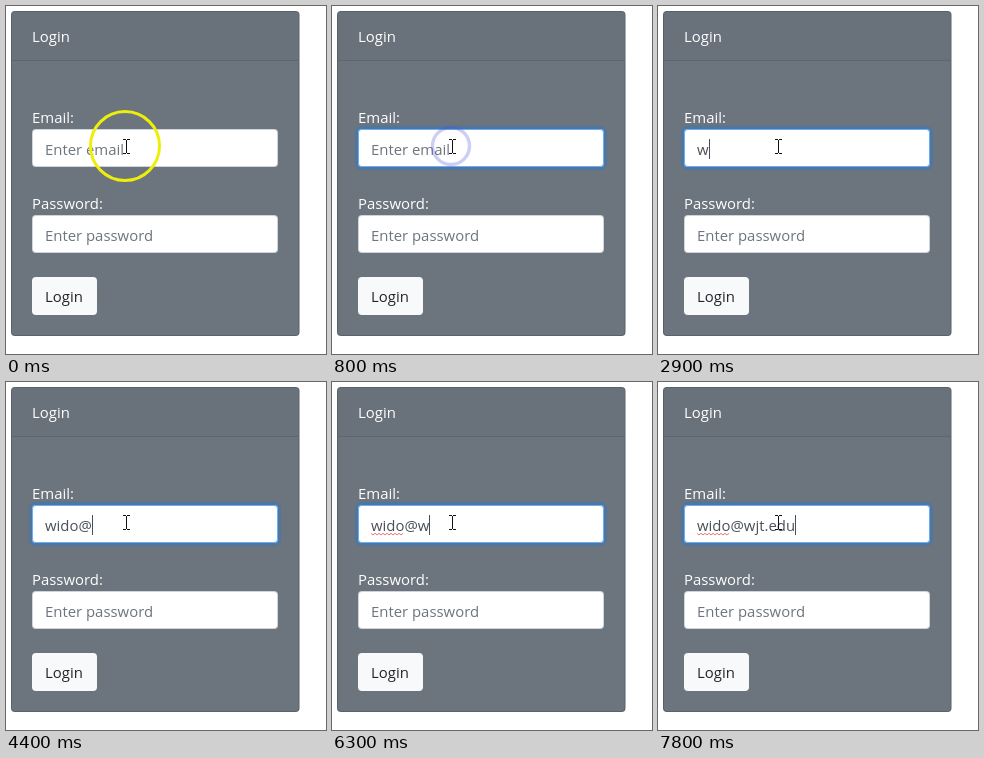
Animation, 320 px wide and 348 px high, one loop 8000 ms. Source, as an HTML page with a canvas:

```html
<!DOCTYPE html>
<html lang="en">
<head>
<meta charset="utf-8">
<title>Login form</title>
<style>
  html, body { margin: 0; width: 100%; height: 100%; overflow: hidden; background: #fff; }
  canvas { display: block; width: 320px; height: 348px; }
</style>
</head>
<body>
<canvas id="stage"></canvas>
<script>
const LOOP = 8000;
const EMAIL = 'wido@wjt.edu';
const FONT = '14.9px "Open Sans", "Noto Sans", sans-serif';
const POINTER = { x: 120, y: 140 };

// [time, characters typed]
const TYPING = [[0, 0], [2900, 1], [3200, 2], [3400, 3], [3600, 4], [4400, 5],
  [6300, 6], [6500, 7], [6700, 8], [7300, 9], [7500, 10], [7800, 12]];
// [time, caret visible]
const CARET = [[0, 0], [200, 1], [700, 0], [1200, 1], [1800, 0], [2400, 1],
  [4000, 0], [4400, 1], [5000, 0], [5500, 1], [6000, 0], [6300, 1]];
// [time, radius, line width, opacity, colour]
const YELLOW = '#eeee0c', BLUE = '#4753dc';
const RINGS = [[0, 34.5, 3, 1, YELLOW], [100, 26, 3.2, 1, BLUE], [200, 17, 3.4, 1, BLUE],
  [300, 9.5, 3.4, 1, BLUE], [400, 8.5, 3.4, 1, BLUE], [600, 11.5, 3.4, 0.8, BLUE],
  [700, 15, 3.4, 0.55, BLUE], [800, 18.5, 3.4, 0.28, BLUE], [1000, 0, 0, 0, BLUE]];

const canvas = document.getElementById('stage');
const ctx = canvas.getContext('2d');
const ratio = window.devicePixelRatio || 1;
canvas.width = 320 * ratio;
canvas.height = 348 * ratio;

function stepAt(steps, t) {
  let current = steps[0];
  for (const step of steps) if (step[0] <= t) current = step;
  return current;
}

function box(x, y, w, h, r, fill) {
  ctx.fillStyle = fill;
  ctx.beginPath();
  ctx.roundRect(x, y, w, h, r);
  ctx.fill();
}

function text(str, x, y, color) {
  ctx.fillStyle = color;
  ctx.fillText(str, x, y);
}

function field(y, focus) {
  if (focus) {
    ctx.globalAlpha = focus;
    box(22.8, y - 3.2, 252.4, 44.4, 7, 'rgba(0,123,255,.25)');
    ctx.globalAlpha = 1;
  }
  box(26, y, 246, 38, 4, '#ced4da');
  if (focus) {
    ctx.globalAlpha = focus;
    box(26, y, 246, 38, 4, '#69aef8');
    ctx.globalAlpha = 1;
  }
  box(27, y + 1, 244, 36, 3, '#fff');
}

function drawCard() {
  box(5, 5, 288.5, 325, 4, '#59616a');
  box(6, 6, 286.5, 323, 3, '#6c747d');
  box(6, 6, 286.5, 48, [3, 3, 0, 0], '#69717a');
  box(6, 54, 286.5, 1, 0, '#5d656d');
  text('Login', 26, 36, '#fff');
  text('Email:', 26, 117, '#fff');
  text('Password:', 26, 203, '#fff');
  box(26, 271, 65, 38, 4, '#f8f9fa');
  text('Login', 39, 296, '#212529');
}

function drawSquiggle(width) {
  ctx.strokeStyle = 'rgba(226,70,70,.75)';
  ctx.lineWidth = 1;
  ctx.beginPath();
  for (let x = 0; x <= width; x += 2) ctx.lineTo(39 + x, x % 4 ? 153 : 151.3);
  ctx.stroke();
}

function drawEntry(t) {
  const typed = EMAIL.slice(0, stepAt(TYPING, t)[1]);
  if (typed) text(typed, 39, 149, '#495057');
  else text('Enter email', 39, 149, '#6c757d');
  if (t >= 5500) drawSquiggle(ctx.measureText('wido').width);
  if (stepAt(CARET, t)[1]) {
    const x = 39 + Math.round(ctx.measureText(typed).width);
    box(x, 133, 1, 20, 0, '#495057');
  }
}

function drawRing(t) {
  const [, radius, width, alpha, color] = stepAt(RINGS, t);
  if (!alpha) return;
  ctx.globalAlpha = alpha;
  ctx.strokeStyle = color;
  ctx.lineWidth = width;
  ctx.beginPath();
  ctx.arc(POINTER.x - 1, POINTER.y, radius, 0, Math.PI * 2);
  ctx.stroke();
  ctx.globalAlpha = 1;
}

function drawPointer() {
  const { x, y } = POINTER;
  box(x, y - 6, 1, 13, 0, '#111');
  for (const end of [y - 7, y + 7]) {
    box(x - 3, end, 3, 1, 0, '#111');
    box(x + 1, end, 3, 1, 0, '#111');
  }
}

function draw(t) {
  ctx.setTransform(ratio, 0, 0, ratio, 0, 0);
  ctx.font = FONT;
  ctx.textBaseline = 'alphabetic';
  box(0, 0, 320, 348, 0, '#fff');
  drawCard();
  field(123, t < 200 ? 0 : t < 300 ? 0.6 : 1);
  field(209, 0);
  text('Enter password', 39, 235, '#6c757d');
  drawEntry(t);
  drawRing(t);
  drawPointer();
}

const start = performance.now();
function tick() {
  draw((performance.now() - start) % LOOP);
  requestAnimationFrame(tick);
}
tick();
</script>
</body>
</html>
```
